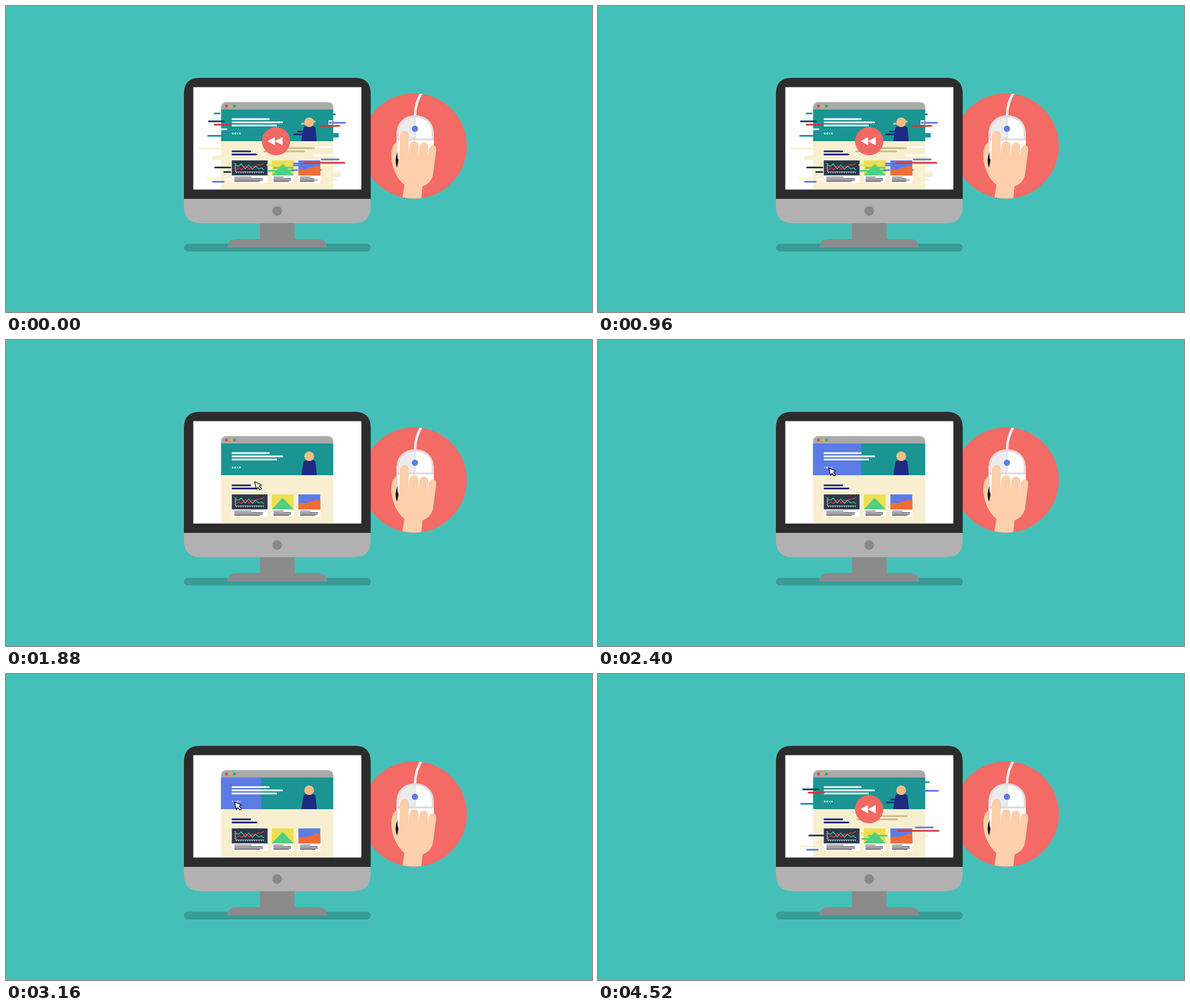
Animation, 1034 px wide and 541 px high, one loop 4560 ms. Source, as an HTML page:

```html
<!DOCTYPE html>
<html lang="en">
<head>
<meta charset="utf-8">
<title>Session replay</title>
<style>
  html, body { margin: 0; width: 100%; height: 100%; overflow: hidden; background: #45c0b9; }
  svg { display: block; width: 100vw; height: 100vh; }
  .glitch path { fill: none; stroke-width: 3; stroke-linecap: round; }
  .glitch .block { stroke-linecap: butt; stroke-width: 8; }
</style>
</head>
<body>
<svg viewBox="0 0 1034 541" preserveAspectRatio="xMidYMid meet">
  <defs>
    <clipPath id="disc"><circle cx="720" cy="247.5" r="93"/></clipPath>
    <clipPath id="screen"><path d="M331 144H627V324H331Z"/></clipPath>
    <g id="copy" fill="none" stroke="#30343c" stroke-width="1.3"></g>
  </defs>

  <circle cx="720" cy="247.5" r="93" fill="#f46a64" stroke="#b98c84" stroke-width=".6"/>
  <g clip-path="url(#disc)">
    <g id="hand">
      <path d="M722 196C721 178 727 163 735 150" fill="none" stroke="#f2efee" stroke-width="4.5"/>
      <path d="M689 222V274H755V222Z" fill="#fff"/>
      <path d="M691 236V224C691 206 705 195 722 195S753 206 753 224V236Z" fill="#fff"/>
      <path id="key" d="M691 236V224C691 206 705 195 722 195V236Z" fill="#ececec"/>
      <path d="M722 196V235" stroke="#dadada" stroke-width="1.5"/>
      <path d="M691 236V224C691 206 705 195 722 195S753 206 753 224V236Z" fill="none" stroke="#dbdcdd" stroke-width="3.6"/>
      <circle cx="721.5" cy="217" r="5.5" fill="#5b7ce6"/>
      <path fill="#fdcfab" d="M698 348L703 316C692 308 680 288 680 264Q680 244 691 240L690 285L694 268L695 230Q696 221 703.5 221Q711 222 711 230L710 262L712.5 246Q714 239 720.5 239Q728 240 728 248L727 264L730 248Q732 241 738 241Q745 242 745 249L744 266L746.5 252Q749 246 753 246Q760 247 759 255L754 294Q752 313 735 319L732 348Z"/>
      <path d="M691 258Q684.500 272 690 286L692.500 272Q690 268 691 258Z" fill="#0b0b0b"/>
    </g>
  </g>

  <rect x="314" y="420.500" width="329.500" height="13.500" rx="6.700" fill="#389b95"/>
  <path d="M448 383H509V413H448Z" fill="#8b8b8b"/>
  <path d="M390 427Q392 412 407 412H550Q565 412 567 427Z" fill="#8b8b8b"/>
  <path d="M314 342V155Q314 127 342 127H615.500Q643.500 127 643.500 155V342Z" fill="#2c2c2c"/>
  <path d="M314 341H643.500V354Q643.500 384 613.500 384H344Q314 384 314 354Z" fill="#b1b1b1"/>
  <circle cx="478.500" cy="362.500" r="8.500" fill="#888"/>
  <path d="M330.500 143.500H627V324.500H330.500Z" fill="#fff"/>

  <g clip-path="url(#screen)">
    <path d="M379.500 184V180Q379.500 170 389.500 170H567.500Q577.500 170 577.500 180V184Z" fill="#a9a9a9"/>
    <circle cx="389" cy="177" r="2.400" fill="#dc3a40"/>
    <circle cx="396" cy="177" r="2.400" fill="#e3ae4e"/>
    <circle cx="403" cy="177" r="2.400" fill="#2ca65a"/>
    <path d="M379.500 183H577.500V239H379.500Z" fill="#1a9594"/>
    <rect id="slide" x="379.500" y="183" width="0" height="56" fill="#5b7ce6"/>
    <path d="M379.500 239H577.500V325H379.500Z" fill="#f8efd0"/>
    <path d="M398.500 200H465M398.500 205.700H488.500M398.500 211.300H478" stroke="#fff" stroke-width="2.900"/>
    <g id="dots" fill="#fff"></g>
    <path d="M525 215Q526 212.500 529 212.500H542Q545 212.500 546 216L548.500 239H521Z" fill="#1c2a80"/>
    <circle cx="535" cy="205.500" r="8.600" fill="#f6bd85"/>
    <path d="M398.500 257H432M398.500 262.500H443.500" stroke="#1b247d" stroke-width="2.900"/>

    <path d="M398.500 299H461.500V313H398.500ZM469 299H507.500V313H469ZM516 299H554.500V313H516Z" fill="#fff"/>
    <path d="M398.500 273H461.500V299.500H398.500Z" fill="#2b394a"/>
    <path d="M405 278V293.500H455" fill="none" stroke="#dfe5e8" stroke-width=".9"/>
    <path d="M403.500 278V293M406 294.700H455" stroke="#dfe5e8" stroke-width="1.700" stroke-dasharray=".8 3.200"/>
    <path d="M406 290L411 286L416 289L423 282L429 288L434 283L440 284L445 281H451L455 278" fill="none" stroke="#d5333d" stroke-width="1.600"/>
    <path d="M406 282L411 283L415 279L422 288L428 281L435 289L440 283L446 288L451 286L455 290" fill="none" stroke="#3ccf96" stroke-width="1.400"/>
    <path d="M469 273H507.500V299.500H469Z" fill="#ecdf50"/>
    <path d="M469 299.500L488.300 279L507.500 299.500Z" fill="#4fcf83"/>
    <path d="M516 273H554.500V299.500H516Z" fill="#5b7ce6"/>
    <path d="M516 299.500V291Q521 286 528 289Q533 288 536 285Q542 286 546 282Q551 282 554.500 285V299.500Z" fill="#f16c34"/>
    <path d="M403 302.500H433M403 305.300H453M403 307.800H453M403 310.200H448M472 302.500H490M472 305.300H503M472 307.800H503M472 310.200H499M519 302.500H537M519 305.300H550M519 307.800H550M519 310.200H546" stroke="#363840" stroke-width="1.200"/>
    <g id="glitch" class="glitch"></g>
  </g>

  <g id="button">
    <circle cx="478.500" cy="239" r="25" fill="#f26963"/>
    <path id="rewind" d="M463.500 239L476.500 231.800V246.200ZM476.500 239L490 231.800V246.200Z" fill="#fff"/>
    <path id="play" d="M473.500 232L486.500 239L473.500 246Z" fill="#fff"/>
  </g>
  <path id="cursor" d="M0 0L12.500 5.500L8.500 7.500L12.500 12L9.500 14.500L6 10L3.500 13.500Z" fill="#fff" stroke="#111" stroke-width="1.300" stroke-linejoin="round"/>
</svg>

<script>
const LOOP = 4560, STEP = 40, TILT = -4.3;
const $ = id => document.getElementById(id);
const teal = '#1a9594', ink = '#0d444b', red = '#d9363c', blue = '#5b7ce6', navy = '#1c2a80',
      cream = '#f8efd0', khaki = '#c9b98a', slate = '#2b394a', white = '#fff',
      green = '#4fcf83', yellow = '#ecdf50', skin = '#f6bd85', orange = '#f16c34';

// Each layer: when it returns, the period of its sideways drift, its strokes.
const layers = [
  { on: 4560, sway: 960, marks: [
    [white, 'M549 249.500H578M546 264H578'],
    [white, 'M571 206H578', 1],
    [cream, 'M366 268.500H382', 1],
    [teal, 'M577 228.500H589', 1],
  ]},
  { on: 4560, sway: 480, marks: [
    [cream, 'M344 252H381M392 281H400M577 268H590M577 283H586M577 307H587'],
    [cream, 'M577 298H595', 1],
    [teal, 'M372 190H381'],
    [white, 'M380 218H393M393 306H400M549 305H559M549 310H555'],
    [slate, 'M389 293.500H400'],
    [red, 'M559 212H592'],
    [skin, 'M538 204H549M526 208H532'],
    [yellow, 'M496 281H513'],
    [green, 'M494 291H511'],
    [blue, 'M512 278.500H520M512 282H520M509 290H518'],
    [orange, 'M546 290H560'],
  ]},
  { on: 3920, sway: 960, marks: [
    [teal, 'M358.500 229.500H382'],
    [navy, 'M517 222H526M510 227H526'],
    [khaki, 'M499 251.300H545M458 257H528'],
    [blue, 'M573 206.500H600'],
  ]},
  { on: 4080, sway: 480, marks: [
    [ink, 'M362 204H389'],
    [red, 'M372 209.700H399M530 277.300H601'],
    [slate, 'M373 285.500H400'],
    [cream, 'M358 305H383M577 286H581'],
    [blue, 'M369 310.800H388M561 271.300H591'],
    [teal, 'M577 191.300H584.500'],
    [yellow, 'M465 281H476'],
    [green, 'M477 286H510M467 291.500H480'],
  ]},
];

const svg = (tag, attrs, parent) => {
  const el = document.createElementNS('http://www.w3.org/2000/svg', tag);
  for (const k in attrs) el.setAttribute(k, attrs[k]);
  return parent.appendChild(el);
};
for (const layer of layers) {
  layer.el = svg('g', {}, $('glitch'));
  layer.paths = layer.marks.map(([stroke, d, block]) =>
    svg('path', { stroke, d, class: block ? 'block' : 'line' }, layer.el));
}
const dots = [0, 1, 2, 3].map(i => svg('circle', { cx: 400 + i * 4.2, cy: 225.5, r: 1.4 }, $('dots')));

const ease = p => (1 - Math.cos(Math.PI * p)) / 2;
const track = (t, keys) => {
  if (t <= keys[0][0]) return keys[0][1];
  for (let i = 1; i < keys.length; i++) {
    const [a, u] = keys[i - 1], [b, v] = keys[i];
    if (t <= b) return u + (v - u) * ease((t - a) / (b - a));
  }
  return keys[keys.length - 1][1];
};
const within = (t, a, b) => t >= a && t < b;
const show = (el, on) => el.setAttribute('visibility', on ? 'visible' : 'hidden');
const sway = (t, period) => 2 * Math.cos(2 * Math.PI * (t - LOOP) / period) - 2;

const tilt = [[1080, 0], [1200, TILT], [1480, TILT], [1640, 0],
  [1960, 0], [2080, TILT], [2160, TILT], [2280, 0],
  [2660, 0], [2760, TILT], [2860, TILT], [2980, 0],
  [3440, 0], [3560, TILT], [3640, TILT], [3760, 0]];
const slide = [[2200, 0], [2640, 198], [2900, 198], [3340, 0]];
const cursorX = [[1720, 470], [2040, 407], [2680, 407], [2800, 403], [3280, 403], [3560, 440]];
const cursorY = [[1720, 275], [2040, 226], [3280, 226], [3560, 285]];
const cursorFade = [[1720, 0], [1800, 1], [3480, 1], [3600, 0]];
const buttonSize = [[1520, 1], [1680, 0], [4000, 0], [4160, 1]];

function draw(t) {
  $('hand').setAttribute('transform', `rotate(${track(t, tilt)} 720 247)`);
  const pressed = within(t, 1240, 1480) || within(t, 2080, 2200) || within(t, 2760, 2900);
  $('key').setAttribute('fill', pressed ? '#d5d5d5' : '#ececec');

  $('slide').setAttribute('width', track(t, slide));
  const hover = within(t, 2040, 3400);
  dots.forEach((dot, i) => dot.setAttribute('opacity', hover && i !== (t < 2760 ? 1 : 2) ? .5 : 1));
  $('cursor').setAttribute('transform', `translate(${track(t, cursorX)} ${track(t, cursorY)})`);
  $('cursor').setAttribute('opacity', track(t, cursorFade));

  for (const { el, on, sway: period, paths } of layers) {
    el.setAttribute('transform', `translate(${sway(t, period)} 0)`);
    paths.forEach((p, i) => show(p, t >= on + i * STEP || t < 1200 - i % 3 * STEP));
  }

  const dx = t < 960 || t > 4000 ? sway(t, 960) : 0, size = track(t, buttonSize);
  $('button').setAttribute('transform', `translate(${478.5 + dx} 239) scale(${size}) translate(-478.5 -239)`);
  show($('button'), size > 0);
  const playing = within(t, 1200, 3000);
  $('play').setAttribute('opacity', playing ? 1 : 0);
  $('rewind').setAttribute('opacity', playing ? 0 : 1);
}

const start = performance.now();
function tick() {
  const t = (performance.now() - start) % LOOP;
  draw(Math.floor(t / STEP) * STEP);
  requestAnimationFrame(tick);
}
tick();
</script>
</body>
</html>
```
